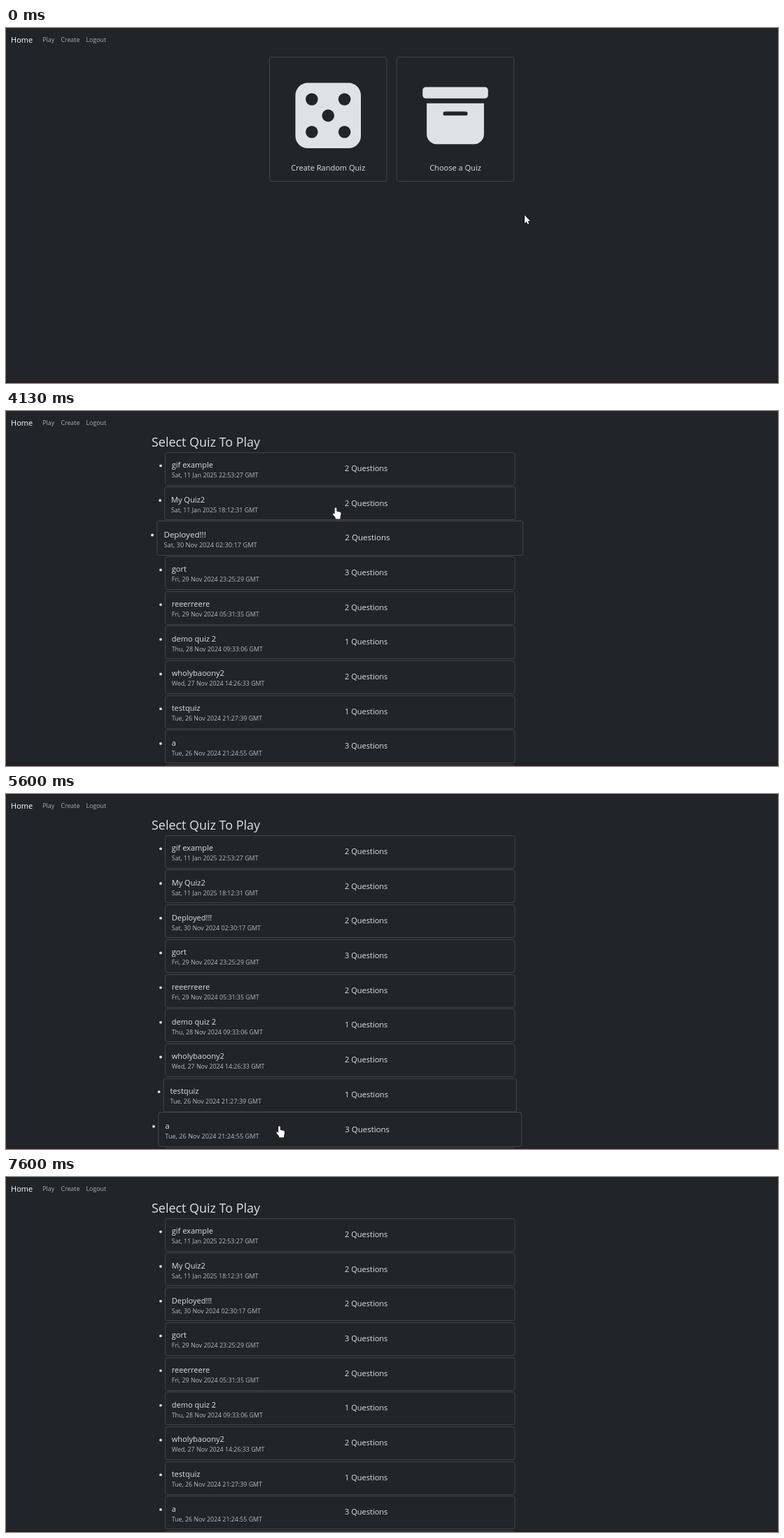
Recreate the animation shown at these times as an HTML page with a canvas. Size 1103 px wide and 508 px high, loop 8340 ms.

```html
<!DOCTYPE html>
<html lang="en">
<head>
<meta charset="utf-8">
<title>Quiz picker</title>
<style>
html, body { margin: 0; width: 100%; height: 100%; overflow: hidden; background: #212529; }
canvas { display: block; width: 1103px; height: 508px; }
</style>
</head>
<body>
<canvas id="stage"></canvas>
<script>
const W = 1103, H = 508, LOOP = 8340, FPS = 15;
const PAGE_OUT = 2400, ARROW_BACK = 2730, LIST_IN = 3800;
const BG = '#212529', FG = '#dee2e6', MUTED = '#b7bbbf', NAV = '#acb0b3', BORDER = '#404447';
const GROW = 0.05, FADE = 200, LAG = 57;
const SMALL = 9.2, MEDIUM = 11.5, LARGE = 18.7;

const canvas = document.getElementById('stage');
const ctx = canvas.getContext('2d');
const dpr = window.devicePixelRatio || 1;
canvas.width = W * dpr;
canvas.height = H * dpr;

const quizzes = `gif example|Sat, 11 Jan 2025 22:53:27|2
My Quiz2|Sat, 11 Jan 2025 18:12:31|2
Deployed!!!|Sat, 30 Nov 2024 02:30:17|2
gort|Fri, 29 Nov 2024 23:25:29|3
reeerreere|Fri, 29 Nov 2024 05:31:35|2
demo quiz 2|Thu, 28 Nov 2024 09:33:06|1
wholybaoony2|Wed, 27 Nov 2024 14:26:33|2
testquiz|Tue, 26 Nov 2024 21:27:39|1
a|Tue, 26 Nov 2024 21:24:55|3`.split('\n').map(line => line.split('|'));

const list = { x: 227.5, y: 59.2, w: 499.5, h: 47.4, pitch: 49.7 };
const card = { y: 41.5, w: 167.5, h: 178 };
const DICE_X = 460.25, BOX_X = 642;

// Turning points of the pointer: time, x, y
const path = [
  [1000, 741, 268], [1600, 633, 168], [3800, 633, 168], [4010, 560, 165], [4130, 471, 138],
  [4600, 400, 80], [5130, 395, 336], [5500, 390, 465], [5800, 392, 485], [6200, 389, 340],
  [6600, 315, 185], [6870, 301, 237], [7070, 235, 252], [7200, 69, 415], [7400, 40, 530]
];

// Monotone cubic through the turning points
function coord(t, axis) {
  const last = path.length - 1;
  if (t <= path[0][0]) return path[0][axis];
  if (t >= path[last][0]) return path[last][axis];
  const rate = i => (path[i + 1][axis] - path[i][axis]) / (path[i + 1][0] - path[i][0]);
  const slope = i => {
    if (i === 0 || i === last) return 0;
    const a = rate(i - 1), b = rate(i);
    return a * b > 0 ? 2 * a * b / (a + b) : 0;
  };
  const i = path.findIndex(p => p[0] > t) - 1;
  const span = path[i + 1][0] - path[i][0];
  const u = (t - path[i][0]) / span, v = 1 - u;
  return path[i][axis] * v * v * (1 + 2 * u) + path[i + 1][axis] * u * u * (3 - 2 * u) +
    span * u * v * (slope(i) * v - slope(i + 1) * u);
}

function hit(t) {
  const x = coord(t, 1), y = coord(t, 2);
  if (t < PAGE_OUT) {
    return Math.abs(x - BOX_X) < card.w / 2 && y > card.y && y < card.y + card.h ? 'box' : null;
  }
  if (t < LIST_IN || x < list.x || x > list.x + list.w) return null;
  const row = Math.floor((y - list.y + 1) / list.pitch);
  return row >= 0 && row < quizzes.length ? row : null;
}

const hovers = [];
for (let t = 0, last = null; t < LOOP; t += 2) {
  const id = hit(t - LAG);
  if (id !== last) hovers.push({ t, id });
  last = id;
}

// cubic-bezier(.25, .1, .25, 1)
function ease(x) {
  if (x <= 0) return 0;
  if (x >= 1) return 1;
  let lo = 0, hi = 1, u = 0.5;
  for (let i = 0; i < 20; i++) {
    u = (lo + hi) / 2;
    if (0.75 * u * (1 - u) + u ** 3 < x) lo = u; else hi = u;
  }
  return 0.3 * u * (1 - u) ** 2 + 3 * u * u * (1 - u) + u ** 3;
}

// A transition reversed halfway takes proportionally less time.
function scaleOf(id, t) {
  let from = 0, to = 0, start = 0, span = FADE;
  const at = x => from + (to - from) * ease((x - start) / span);
  for (const h of hovers) {
    if (h.t > t) break;
    const want = h.id === id ? 1 : 0;
    if (want === to) continue;
    from = at(h.t);
    to = want;
    start = h.t;
    span = Math.max(1, FADE * Math.abs(to - from));
  }
  return 1 + GROW * at(t);
}

function hoverAt(t) {
  const past = hovers.filter(h => h.t <= t);
  return past.length ? past[past.length - 1].id : null;
}

// Returns the x where the text ends.
function text(str, x, y, size, color, align = 'left') {
  ctx.font = `${size * 0.96}px "Open Sans", "Noto Sans", sans-serif`;
  ctx.textAlign = align;
  ctx.fillStyle = color;
  ctx.fillText(str, x, y);
  return x + ctx.measureText(str).width;
}

function fillRounded(x, y, w, h, r, color) {
  ctx.beginPath();
  ctx.roundRect(x, y, w, h, r);
  ctx.fillStyle = color;
  ctx.fill();
}

function dot(x, y, r, color) {
  ctx.beginPath();
  ctx.arc(x, y, r, 0, Math.PI * 2);
  ctx.fillStyle = color;
  ctx.fill();
}

function outline(x, y, w, h) {
  ctx.beginPath();
  ctx.roundRect(x, y, w, h, 3.4);
  ctx.strokeStyle = BORDER;
  ctx.lineWidth = 1;
  ctx.stroke();
}

function scaled(cx, cy, s, draw) {
  ctx.save();
  ctx.translate(cx, cy);
  ctx.scale(s, s);
  ctx.translate(-cx, -cy);
  draw();
  ctx.restore();
}

// Icons live on a 16 unit grid.
function diceIcon() {
  fillRounded(0, 0, 16, 16, 3, FG);
  dot(8, 8, 1.5, BG);
  for (let i = 0; i < 4; i++) dot(i % 2 ? 12 : 4, i < 2 ? 4 : 12, 1.5, BG);
}

function boxIcon() {
  fillRounded(0, 1, 16, 2.8, 0.8, FG);
  fillRounded(1, 5, 14, 10, [0, 0, 2.45, 2.45], FG);
  fillRounded(5, 7, 6, 1, 0.5, BG);
}

function choice(cx, label, icon, s) {
  scaled(cx, card.y + card.h / 2, s, () => {
    outline(cx - card.w / 2, card.y, card.w, card.h);
    text(label, cx, 203.7, MEDIUM, FG, 'center');
    ctx.translate(cx - 46.75, 78.6);
    ctx.scale(5.845, 5.845);
    icon();
  });
}

function row(i, t) {
  const { x, w, h } = list;
  const y = list.y + i * list.pitch;
  scaled(x + w / 2, y + h / 2, scaleOf(i, t), () => {
    outline(x, Math.floor(y) + 0.5, w, Math.floor(h));
    if (!quizzes[i]) return;
    const [name, date, count] = quizzes[i];
    dot(221, y + 19.1, 1.9, FG);
    text(name, 236.7, y + 22, MEDIUM, FG);
    text(date + ' GMT', 236.7, y + 36, SMALL, MUTED);
    text(count + ' Questions', 484, y + 26.6, MEDIUM, FG);
  });
}

const arrow = new Path2D('M0 0V11.4L2.7 8.9L4.4 12.7L6.2 11.9L4.6 8.2H8Z');
const hand = new Path2D('M-1.4 1.2Q0 -.9 1.4 1.2V5.6L6 6.6Q8 7.2 7.6 9.4L6.6 13.8V16.4H-.3V14.6' +
  'L-4 10Q-4.6 8.2 -3 8.4L-1.4 9.6Z');

function cursor(t) {
  if (t >= PAGE_OUT && t < ARROW_BACK) return;
  const shape = hoverAt(t) === null ? arrow : hand;
  ctx.save();
  ctx.translate(coord(t, 1), coord(t, 2));
  ctx.lineWidth = 1;
  ctx.strokeStyle = '#000';
  ctx.stroke(shape);
  ctx.fillStyle = '#fff';
  ctx.fill(shape);
  ctx.restore();
}

function draw(t) {
  ctx.setTransform(dpr, 0, 0, dpr, 0, 0);
  ctx.fillStyle = BG;
  ctx.fillRect(0, 0, W, H);
  ctx.fillStyle = '#2b1d20';
  ctx.fillRect(0, 505, W, 3);

  text('Home', 7, 20.9, MEDIUM, '#fff');
  let x = 52.3;
  for (const link of ['Play', 'Create', 'Logout']) x = text(link, x, 20, SMALL, NAV) + SMALL;

  if (t < PAGE_OUT) {
    choice(DICE_X, 'Create Random Quiz', diceIcon, 1);
    choice(BOX_X, 'Choose a Quiz', boxIcon, scaleOf('box', t));
  } else if (t >= LIST_IN) {
    text('Select Quiz To Play', 208, 51.3, LARGE, FG);
    for (let i = 0; i <= quizzes.length; i++) row(i, t);
  }
  cursor(t);
}

// Hold each step; starts are rounded to 10 ms.
function step(t) {
  const start = k => Math.round(k * 100 / FPS) * 10;
  let k = Math.floor(t * FPS / 1000) + 1;
  while (start(k) > t) k--;
  return start(k);
}

function tick() {
  draw(step(performance.now() % LOOP));
  requestAnimationFrame(tick);
}
tick();
</script>
</body>
</html>
```
